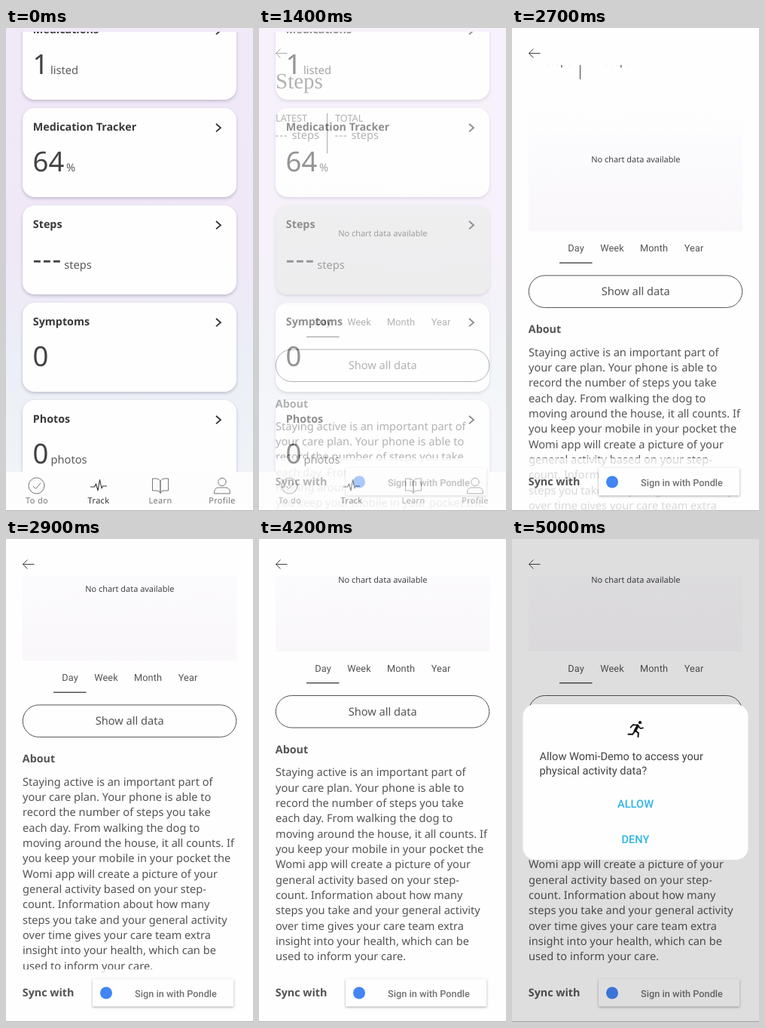
An HTML page with a canvas that plays this animation: 328x640 px, repeating every 5.1 s.

```html
<!DOCTYPE html>
<html lang="en">
<head>
<meta charset="utf-8">
<title>Step tracking</title>
<style>
  html, body { margin: 0; width: 100%; height: 100%; overflow: hidden; background: #fefefe; }
  canvas { display: block; width: 100vw; height: 100vh; }
</style>
</head>
<body>
<canvas id="stage"></canvas>
<script>
const W = 328, H = 640, LOOP = 5100, TICK = 100;
const SCROLL_END = 218.5;
const SANS = '"Noto Sans", sans-serif';
const ROBOTO = 'Roboto, sans-serif';
const SERIF = '"Liberation Serif", serif';
const INK = '#424242', SOFT = '#545454';
const BODY = 14.6, HEAD = 14.3, SMALL = 12.75, TINY = 10.93, BIG = 36.45;

const dpr = window.devicePixelRatio || 1;
const makeCanvas = (el) => {
  el.width = Math.round(W * dpr);
  el.height = Math.round(H * dpr);
  return el;
};
const stage = makeCanvas(document.getElementById('stage'));
const sheet = makeCanvas(document.createElement('canvas'));
const main = stage.getContext('2d');
const layerCtx = sheet.getContext('2d');
let g = main;

const clamp = (v) => Math.max(0, Math.min(1, v));

function text(str, x, y, size, o = {}) {
  g.font = `${o.weight || 400} ${size}px ${o.family || SANS}`;
  g.textRendering = 'geometricPrecision';
  g.letterSpacing = `${o.spacing || 0}px`;
  g.textAlign = o.align || 'left';
  g.fillStyle = o.color || SOFT;
  g.fillText(str, x, y);
}

function line(points, width = 1, color = INK, cap = 'butt') {
  g.beginPath();
  points.forEach(([x, y], i) => i ? g.lineTo(x, y) : g.moveTo(x, y));
  g.lineWidth = width;
  g.strokeStyle = color;
  g.lineCap = cap;
  g.lineJoin = cap === 'round' ? 'round' : 'miter';
  g.stroke();
}

function box(x, y, w, h, r) {
  g.beginPath();
  g.roundRect(x, y, w, h, r);
}

function disc(x, y, r, color) {
  g.beginPath();
  g.arc(x, y, r, 0, Math.PI * 2);
  g.fillStyle = color;
  g.fill();
}

function shadow(color, blur, dy) {
  g.shadowColor = color;
  g.shadowBlur = blur * dpr;
  g.shadowOffsetY = dy * dpr;
}

function gradient(y0, y1, stops) {
  const fill = g.createLinearGradient(0, y0, 0, y1);
  stops.forEach(([at, color]) => fill.addColorStop(at, color));
  return fill;
}

function clipped(path, draw) {
  g.save();
  path();
  g.clip();
  draw();
  g.restore();
}

// Draws a whole screen off stage, then blends it in as one piece.
function layer(alpha, scale, cy, draw) {
  if (alpha <= 0) return;
  g = layerCtx;
  g.setTransform(dpr, 0, 0, dpr, 0, 0);
  g.clearRect(0, 0, W, H);
  draw();
  g = main;
  g.save();
  g.globalAlpha = alpha;
  g.translate(W / 2, cy);
  g.scale(scale, scale);
  g.drawImage(sheet, -W / 2, -cy, W, H);
  g.restore();
}

const cards = [
  { title: 'Medications', value: '1', unit: 'listed', unitX: 59 },
  { title: 'Medication Tracker', value: '64', unit: '%', unitX: 80 },
  { title: 'Steps', value: '---', unit: 'steps', unitX: 77.2, spacing: 1.2 },
  { title: 'Symptoms', value: '0', unit: '', unitX: 59 },
  { title: 'Photos', value: '0', unit: 'photos', unitX: 59.6 }
];

function card(c, y, ripple) {
  const shape = () => box(22, y, 284, 118, 16);
  g.save();
  shadow('rgba(70,60,90,0.28)', 4, 2);
  shape();
  g.fillStyle = '#fefefe';
  g.fill();
  g.restore();
  if (ripple) clipped(shape, () => disc(196, 305, ripple, '#e5e5e5'));
  text(c.title, 35.8, y + 30, HEAD, { weight: 600, color: '#3a3a3a' });
  text(c.value, 35.6, y + 84, BIG, { spacing: c.spacing, color: INK });
  text(c.unit, c.unitX, y + 83.7, BODY, { color: '#5a5a5a' });
  line([[279, y + 21], [285, y + 26.2], [279, y + 31.4]], 1.8, '#333');
}

const icons = [
  () => {
    g.beginPath();
    g.arc(40.5, 606.5, 10.5, 0, Math.PI * 2);
    g.stroke();
    line([[36, 607], [39.5, 610.5], [46, 603]], 1, '#777');
  },
  () => line([[112.5, 608], [117.5, 608], [119.5, 604], [122, 613], [124.5, 598.5],
              [127, 610], [128.5, 607], [133.5, 607]], 1.1, '#333', 'round'),
  () => {
    for (const s of [-1, 1]) {
      g.beginPath();
      g.moveTo(205, 600);
      g.quadraticCurveTo(205 + s * 2, 597, 205 + s * 6, 597);
      g.lineTo(205 + s * 10.5, 597);
      g.lineTo(205 + s * 10.5, 613);
      g.lineTo(205 + s * 5, 613);
      g.quadraticCurveTo(205 + s, 613, 205, 616);
      g.closePath();
      g.stroke();
    }
  },
  () => {
    g.beginPath();
    g.arc(287, 601.5, 5.2, 0, Math.PI * 2);
    g.stroke();
    g.beginPath();
    g.moveTo(276.5, 616.5);
    g.bezierCurveTo(276.5, 608, 281, 609, 287, 609);
    g.bezierCurveTo(293, 609, 297.5, 608, 297.5, 616.5);
    g.closePath();
    g.stroke();
  }
];

function tabBar() {
  g.fillStyle = '#fdfdfd';
  g.fillRect(0, 588, W, 52);
  ['To do', 'Track', 'Learn', 'Profile'].forEach((label, i) => {
    g.lineWidth = 1;
    g.strokeStyle = '#777';
    icons[i]();
    text(label, 41 + 82 * i, 630, TINY,
      { align: 'center', spacing: 0.35, color: i === 1 ? '#333' : '#777' });
  });
}

function bottomEdge() {
  g.fillStyle = '#b4b4b4';
  g.fillRect(0, 639, W, 1);
}

function listScreen(ripple) {
  g.fillStyle = gradient(0, H, [[0, '#f1e8f8'], [0.48, '#f0e8f7'], [0.68, '#ebeff6'], [1, '#f1f4f8']]);
  g.fillRect(0, 0, W, H);
  clipped(() => box(0, 5, W, H, 0), () =>
    cards.forEach((c, i) => card(c, -23 + 129 * i, i === 2 ? ripple : 0)));
  tabBar();
  bottomEdge();
}

const about = [
  'Staying active is an important part of',
  'your care plan. Your phone is able to',
  'record the number of steps you take',
  'each day. From walking the dog to',
  'moving around the house, it all counts. If',
  'you keep your mobile in your pocket the',
  'Womi app will create a picture of your',
  'general activity based on your step-',
  'count. Information about how many',
  'steps you take and your general activity',
  'over time gives your care team extra',
  'insight into your health, which can be',
  'used to inform your care.'
];

function stat(label, x) {
  text(label, x, 123.5, SMALL);
  text('---', x - 0.5, 147, BODY, { spacing: 1.1, weight: 500 });
  text('steps', x + 21.5, 147, BODY);
}

function detailBody() {
  text('Steps', 22, 80, 29, { family: SERIF });
  stat('LATEST', 22);
  line([[90.5, 113], [90.5, 166]]);
  stat('TOTAL', 101);

  g.fillStyle = gradient(190, 367.5, [[0, '#fefefe'], [0.27, '#fefdfe'], [0.27, '#fcfbfe'], [1, '#f9f7fa']]);
  g.fillRect(22, 190, 284.5, 177.5);
  text('No chart data available', 164.3, 276, TINY, { align: 'center', color: INK });

  [['Day', 85], ['Week', 133], ['Month', 188.5], ['Year', 241.5]].forEach(([label, x]) =>
    text(label, x, 394, SMALL, { family: ROBOTO, align: 'center', spacing: 0.1 }));
  line([[63, 409.3], [106.5, 409.3]], 1.6, SOFT);

  box(22.3, 426, 283.5, 42.5, 21.2);
  g.lineWidth = 1;
  g.strokeStyle = SOFT;
  g.stroke();
  text('Show all data', 164.2, 452, BODY, { weight: 500, align: 'center' });

  text('About', 21.8, 502.5, HEAD, { weight: 600 });
  about.forEach((row, i) => text(row, 22, 532.7 + 20.35 * i, BODY));
}

function syncBar() {
  g.fillStyle = 'rgba(254,254,254,0.78)';
  g.fillRect(0, 570, W, 70);
  text('Sync with', 21.8, 606, HEAD, { weight: 600 });
  g.save();
  shadow('rgba(0,0,0,0.35)', 3, 1);
  box(115, 583, 187.3, 36.5, 1);
  g.fillStyle = '#fefefe';
  g.fill();
  g.restore();
  disc(133, 601.5, 8, '#4285f4');
  text('Sign in with Pondle', 171, 606.5, SMALL, { family: ROBOTO, weight: 500, color: '#707070' });
}

function detailScreen(scroll) {
  g.fillStyle = '#fefefe';
  g.fillRect(0, 0, W, H);
  clipped(() => box(0, 49, W, H, 0), () => {
    g.translate(0, -scroll);
    detailBody();
  });
  line([[37.5, 33.5], [22.5, 33.5]]);
  line([[28.5, 27.5], [22.5, 33.5], [28.5, 39.5]]);
  syncBar();
  bottomEdge();
}

function runner() {
  const limb = (points, width) => line(points, width, '#111', 'round');
  disc(170, 243.2, 2.1, '#111');
  limb([[167, 247.5], [163.5, 254]], 3.6);
  limb([[167, 247.2], [170.5, 251], [174, 250.3]], 1.7);
  limb([[166.5, 246.6], [160.5, 246.2], [157.5, 249.8]], 1.7);
  limb([[163.5, 254], [167.8, 256.8], [167.5, 262]], 2);
  limb([[163, 254.5], [160.3, 258.8], [154.5, 258.8]], 2);
}

function dialog() {
  box(14.5, 219, 299, 206, 16);
  g.fillStyle = '#fefefe';
  g.fill();
  runner();
  const body = { family: ROBOTO, color: INK };
  text('Allow Womi-Demo to access your', 36.5, 293, BODY, body);
  text('physical activity data?', 36.5, 312, BODY, body);
  const action = { family: ROBOTO, weight: 500, align: 'center', color: '#2fb4e9' };
  text('ALLOW', 164, 356.3, BODY, action);
  text('DENY', 164, 403.3, BODY, action);
}

function render(t) {
  main.setTransform(dpr, 0, 0, dpr, 0, 0);
  const opened = clamp((t - 1300) / 400);
  const shown = 1 - (1 - opened) ** 2;
  const scrolled = clamp((t - 2600) / 400);
  const scroll = SCROLL_END * (1 - (1 - scrolled) ** 2.07);

  if (shown < 1) {
    listScreen(t >= 1200 ? 90 + 0.8 * (t - 1200) : 0);
    layer(shown, 1, H / 2, () => detailScreen(0));
  } else {
    detailScreen(scroll);
  }

  const asked = clamp((t - 4600) / 400);
  if (asked > 0) {
    g.fillStyle = `rgba(0,0,0,${0.125 * asked})`;
    g.fillRect(0, 0, W, H);
    const pop = clamp(asked * 1.6);
    layer(pop, 0.94 + 0.06 * pop, 322, dialog);
  }
}

const start = performance.now();
function frame() {
  const t = (performance.now() - start) % LOOP;
  render(Math.floor(t / TICK) * TICK);
  requestAnimationFrame(frame);
}
frame();
</script>
</body>
</html>
```
